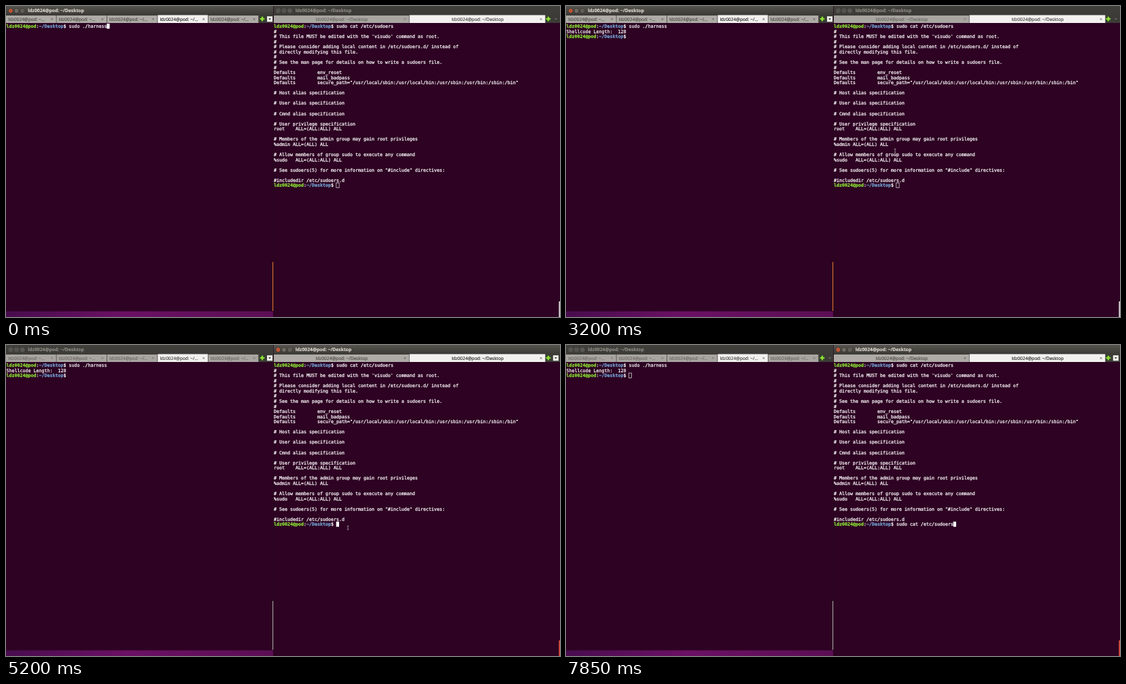
An HTML page with a canvas for the animation above (8 s loop, 815x458 px).

```html
<!DOCTYPE html>
<html lang="en">
<head>
<meta charset="utf-8">
<title>Terminals</title>
<style>
html, body { margin: 0; width: 815px; height: 458px; overflow: hidden; background: #2d0222; }
canvas { display: block; }
</style>
</head>
<body>
<canvas id="stage" width="815" height="458"></canvas>
<script>
const ctx = document.getElementById('stage').getContext('2d');
const LOOP = 8000;
const SCALE = 4 / 9;            // desktop pixels to stage pixels
const CELL = 4, ROW = 17 * SCALE, TOP = 26;
const MONO = '14.95px "DejaVu Sans Mono", monospace';
const UI = '14.67px "Noto Sans", sans-serif';
const UI_BOLD = 'bold 15.3px "Noto Sans", sans-serif';
const BG = '#2d0222', FG = '#f6f4f5', GREEN = '#8ae234', BLUE = '#729fcf', BAR = '#3c3b37';
const USER = 'ldz0024@pod', DIR = '~/Desktop';
const TITLE = USER + ': ' + DIR;
const PROMPT_LEN = USER.length + DIR.length + 3;
const COMMAND = 'sudo cat /etc/sudoers';

const SUDOERS = `#
# This file MUST be edited with the 'visudo' command as root.
#
# Please consider adding local content in /etc/sudoers.d/ instead of
# directly modifying this file.
#
# See the man page for details on how to write a sudoers file.
#
Defaults        env_reset
Defaults        mail_badpass
Defaults        secure_path="/usr/local/sbin:/usr/local/bin:/usr/sbin:/usr/bin:/sbin:/bin"

# Host alias specification

# User alias specification

# Cmnd alias specification

# User privilege specification
root    ALL=(ALL:ALL) ALL

# Members of the admin group may gain root privileges
%admin ALL=(ALL) ALL

# Allow members of group sudo to execute any command
%sudo   ALL=(ALL:ALL) ALL

# See sudoers(5) for more information on "#include" directives:

#includedir /etc/sudoers.d`.split('\n');

// Event times in ms
const ENTER = 2250, FOCUS = 4900, SETTLE = 5300, RECALL = 6850;
const LEFT_BLINK = [150, 600, 1050, 1550, 2000, 2250, 2950, 3450, 3900];
const RIGHT_BLINK = [5300, 5600, 6050, 6550, 7150, 7800];

const blinkOn = (times, t) => times.filter(b => b <= t).length % 2 === 0;

function rect(x, y, w, h, color) {
  ctx.fillStyle = color;
  ctx.fillRect(x, y, w, h);
}

function line(color, width, ...pts) {
  ctx.strokeStyle = color;
  ctx.lineWidth = width;
  ctx.beginPath();
  for (let i = 0; i < pts.length; i += 4) {
    ctx.moveTo(pts[i], pts[i + 1]);
    ctx.lineTo(pts[i + 2], pts[i + 3]);
  }
  ctx.stroke();
}

// weight is a thin outline that keeps small glyphs solid
function text(str, x, y, font, color, align = 'left', weight = 0.25) {
  ctx.save();
  ctx.translate(x, y);
  ctx.scale(SCALE, SCALE);
  ctx.font = font;
  ctx.textAlign = align;
  ctx.textRendering = 'geometricPrecision';
  ctx.fillStyle = ctx.strokeStyle = color;
  ctx.lineWidth = weight;
  ctx.lineJoin = 'round';
  ctx.fillText(str, 0, 0);
  ctx.strokeText(str, 0, 0);
  ctx.restore();
}

function mono(str, x0, col, row, color = FG, bold = false) {
  const font = (bold ? 'bold ' : '') + MONO;
  text(str, x0 + col * CELL, TOP + row * ROW + 6.1, font, color, 'left', 0.6);
}

function prompt(x0, row, command = '') {
  const n = USER.length;
  mono(USER, x0, 0, row, GREEN, true);
  mono(':', x0, n, row);
  mono(DIR, x0, n + 1, row, BLUE, true);
  mono('$ ' + command, x0, n + 1 + DIR.length, row);
}

function cursor(x0, col, row, solid) {
  const x = x0 + col * CELL - 0.3, y = TOP + row * ROW - 0.1;
  if (solid) return rect(x, y, CELL + 0.3, ROW, '#ffffff');
  ctx.strokeStyle = '#e8e3e6';
  ctx.lineWidth = 0.7;
  ctx.strokeRect(x + 0.1, y + 0.2, CELL + 0.3, ROW - 0.2);
}

function cross(x, y, r, color, width) {
  line(color, width, x - r, y - r, x + r, y + r, x - r, y + r, x + r, y - r);
}

function titleBar(x, w, focused) {
  const g = ctx.createLinearGradient(0, 0, 0, 13);
  g.addColorStop(0, focused ? '#55534c' : '#403f3a');
  g.addColorStop(1, BAR);
  rect(x, 0, w, 25, BAR);
  rect(x, 0, w, 13, g);
  for (let i = 0; i < 3; i++) {
    const cx = x + 6.9 + i * 8.6, cy = 7;
    ctx.beginPath();
    ctx.arc(cx, cy, 3.1, 0, Math.PI * 2);
    ctx.fillStyle = !focused ? '#4b4a45' : i ? '#7b7870' : '#ee613a';
    ctx.fill();
    ctx.strokeStyle = focused ? '#32312d' : '#6d6b65';
    ctx.lineWidth = 0.6;
    ctx.stroke();
    const mark = focused ? '#33312c' : '#77746e';
    if (i === 0) cross(cx, cy, 1.1, mark, 0.7);
    if (i === 1) line(mark, 0.7, cx - 1.3, cy, cx + 1.3, cy);
    if (i === 2) {
      ctx.strokeStyle = mark;
      ctx.strokeRect(cx - 1.1, cy - 1, 2.2, 2);
    }
  }
  text(TITLE, x + 32.2, 9.4, UI_BOLD, focused ? '#e4e0d8' : '#918e87');
}

function tab(x, w, label, active, focused, centered) {
  const top = active ? 13.4 : 14;
  rect(x, top, w - 0.7, 25 - top, active ? '#f2f1ef' : focused ? '#aeaba6' : '#a8a5a0');
  const ink = active ? (focused ? '#1e1d1b' : '#3d3b38') : (focused ? '#474440' : '#65625d');
  if (centered) text(label, x + w / 2, 21.6, UI, ink, 'center');
  else text(label, x + 3.2, 21.6, UI, ink);
  cross(x + w - 6.9, 19.4, 1.2, ink, 0.7);
}

function plus(cx, cy, reach, half, color) {
  rect(cx - reach, cy - half, reach * 2, half * 2, color);
  rect(cx - half, cy - reach, half * 2, reach * 2, color);
}

function tabTools(x, button) {
  plus(x + 4.6, 19, 3.6, 1.5, '#3f7a14');
  plus(x + 4.6, 19, 3.1, 1, '#8fe03a');
  const cx = x + 15.6;
  if (button) rect(cx - 4, 15.2, 8, 8, '#f0efec');
  ctx.fillStyle = button ? '#2b2a27' : '#75736d';
  ctx.beginPath();
  ctx.moveTo(cx - 1.9, 18.3);
  ctx.lineTo(cx + 1.9, 18.3);
  ctx.lineTo(cx, 20.5);
  ctx.fill();
}

function leftWindow(t) {
  const focused = t < FOCUS, x0 = 0.5;
  rect(0, 25, 393, 424.6, BG);
  titleBar(0, 393, focused);
  for (let i = 0; i < 5; i++) {
    tab(i * 74.4, 74.4, USER + (i < 2 ? ': ~…' : ': ~/…'), i === 3, focused, false);
  }
  tabTools(372.4, t < SETTLE);

  const wall = ctx.createLinearGradient(0, 0, 393, 0);
  wall.addColorStop(0, '#480c4e');
  wall.addColorStop(0.45, '#6b1064');
  wall.addColorStop(1, '#5b0e54');
  rect(0, 449.6, 393, 8.4, wall);
  rect(392, 377, 1.5, 72, focused ? '#d9722c' : '#a69da2');

  prompt(x0, 0, 'sudo ./harness');
  const done = t >= ENTER;
  if (done) {
    mono('Shellcode Length:  128', x0, 0, 1);
    prompt(x0, 2);
  }
  const col = PROMPT_LEN + (done ? 0 : 14);
  if (t >= SETTLE) cursor(x0, col, 2, false);
  else if (blinkOn(LEFT_BLINK, t)) cursor(x0, col, done ? 2 : 0, true);
}

function rightWindow(t) {
  const focused = t >= FOCUS, x0 = 394;
  rect(393.5, 25, 421.5, 433, BG);
  titleBar(393.5, 421.5, focused);
  tab(394, 199.6, TITLE, false, focused, true);
  tab(593.6, 200.4, TITLE, true, focused, true);
  tabTools(793.2, focused);
  rect(393, 0, 0.6, 458, '#230a1b');
  rect(813.3, 435, 1.7, 23, focused ? '#dc4c3e' : '#d5cfd2');

  prompt(x0, 0, COMMAND);
  SUDOERS.forEach((s, i) => mono(s, x0, 0, i + 1));
  const last = SUDOERS.length + 1, typed = t >= RECALL ? COMMAND : '';
  prompt(x0, last, typed);
  const col = PROMPT_LEN + typed.length;
  if (!focused) cursor(x0, col, last, false);
  else if (blinkOn(RIGHT_BLINK, t)) cursor(x0, col, last, true);
}

function glide(t, start, end, a, b) {
  const p = Math.min(1, Math.max(0, (t - start) / (end - start)));
  const e = p * p * (3 - 2 * p);
  return a.map((v, i) => v + (b[i] - v) * e);
}

function pointer(t) {
  if (t < 2850 || t >= 6550) return;
  const rest = [513, 251], click = [503, 269.3];
  const [x, y] = t < 4450 ? glide(t, 2850, 3550, [455, 175], rest)
    : t < 6250 ? glide(t, 4450, 4550, rest, click)
    : glide(t, 6250, 6550, click, [716, 62]);
  line('#c9c1c6', 0.7, x, y - 2.5, x, y + 2.5,
    x - 1.2, y - 2.7, x + 1.2, y - 2.7, x - 1.2, y + 2.7, x + 1.2, y + 2.7);
}

const began = performance.now();
function draw() {
  const t = (performance.now() - began) % LOOP;
  rect(0, 0, 815, 458, BG);
  leftWindow(t);
  rightWindow(t);
  pointer(t);
  requestAnimationFrame(draw);
}
draw();
</script>
</body>
</html>
```
